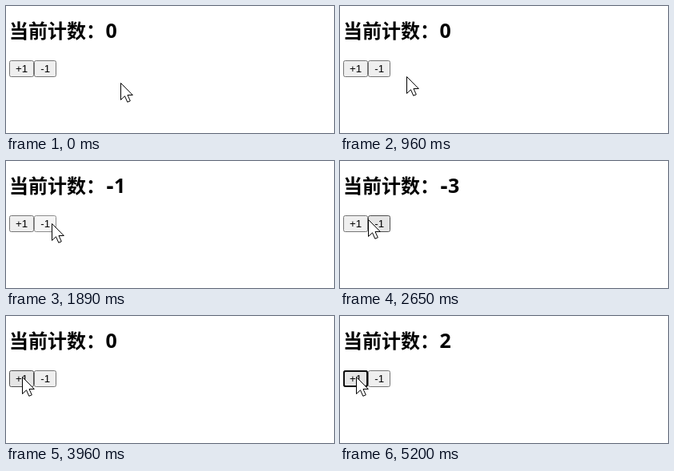
Write an HTML page that moves like this. It is 410 px wide and 159 px high and loops after 5.34 s.

```html
<!DOCTYPE html>
<html lang="zh-CN">
<head>
<meta charset="utf-8">
<title>当前计数</title>
<style>
  html, body { margin: 0; width: 100%; height: 100%; overflow: hidden; background: #fff; }
  svg { display: block; }
  .heading { font: bold 24px "Noto Sans CJK SC", "Noto Sans CJK", sans-serif; }
  .digit { font: bold 25px "Open Sans", sans-serif; }
  .sign { font: bold 24px "DejaVu Sans", sans-serif; }
  .label { font: 13.333px "Liberation Sans", Arial, sans-serif; }
  .button rect { fill: #efefef; stroke: #767676; }
  .button.hover rect { fill: #e5e5e5; stroke: #4f4f4f; }
  .button.active rect { fill: #f5f5f5; stroke: #8d8d8d; }
</style>
</head>
<body>
<svg width="410" height="159" viewBox="0 0 410 159">
  <text class="heading" x="4" y="40">当前计数：</text>
  <text class="sign" id="sign" x="125" y="40">-</text>
  <text class="digit" id="digit" y="40">0</text>
  <g class="button" id="plus">
    <rect x="4.5" y="68.5" width="30" height="20" rx="2"/>
    <text class="label" x="12" y="83">+1</text>
  </g>
  <g class="button" id="minus">
    <rect x="35.5" y="68.5" width="27" height="20" rx="2"/>
    <text class="label" x="43.2" y="83">-1</text>
  </g>
  <rect id="ring" x="5" y="69" width="29" height="19" rx="2" fill="none" stroke="#101010" stroke-width="2"/>
  <path id="cursor" d="M.5 .5V21.5L5.5 16.8 8.8 24.3 12.3 22.8 9 15.5H15.3Z" fill="#fff" stroke="#000"/>
</svg>
<script>
const LOOP = 5340, FOCUS_AT = 5200;

// Pointer tip: time, x, y
const route = [
  [410, 143, 96], [680, 111, 89], [960, 83, 88], [1310, 57, 78],
  [2550, 57, 78], [2650, 35, 73], [2850, 24, 75], [2910, 20, 76]
];

// Mouse down, mouse up, change of the count
const clicks = [
  [1480, 1540, -1], [1890, 2020, -1], [2320, 2420, -1],
  [3140, 3240, 1], [3560, 3640, 1], [3860, 3960, 1], [4180, 4270, 1], [4490, 4620, 1]
];

const [sign, digit, plus, minus, ring, cursor] =
  ['sign', 'digit', 'plus', 'minus', 'ring', 'cursor'].map(id => document.getElementById(id));

function pointerAt(t) {
  const next = route.findIndex(key => key[0] > t);
  if (next === 0) return route[0].slice(1);
  if (next < 0) return route[route.length - 1].slice(1);
  const [t0, x0, y0] = route[next - 1], [t1, x1, y1] = route[next];
  const k = (t - t0) / (t1 - t0);
  return [Math.round(x0 + (x1 - x0) * k), Math.round(y0 + (y1 - y0) * k)];
}

function setState(button, hovered, pressed) {
  button.classList.toggle('hover', hovered);
  button.classList.toggle('active', hovered && pressed);
}

function draw(t) {
  const [x, y] = pointerAt(t);
  const pressed = clicks.some(([down, up]) => t >= down && t < up);
  const count = clicks.reduce((sum, [, up, step]) => sum + (t >= up ? step : 0), 0);

  sign.style.display = count < 0 ? '' : 'none';
  digit.setAttribute('x', count < 0 ? 135 : 124.5);
  digit.textContent = Math.abs(count);

  const inRow = y >= 68 && y < 89;
  setState(plus, inRow && x >= 4 && x < 35, pressed);
  setState(minus, inRow && x >= 35 && x < 63, pressed);
  ring.style.display = t >= FOCUS_AT ? '' : 'none';
  cursor.setAttribute('transform', `translate(${x} ${y})`);
}

const start = performance.now();
function tick() {
  draw((performance.now() - start) % LOOP);
  requestAnimationFrame(tick);
}
tick();
</script>
</body>
</html>
```
